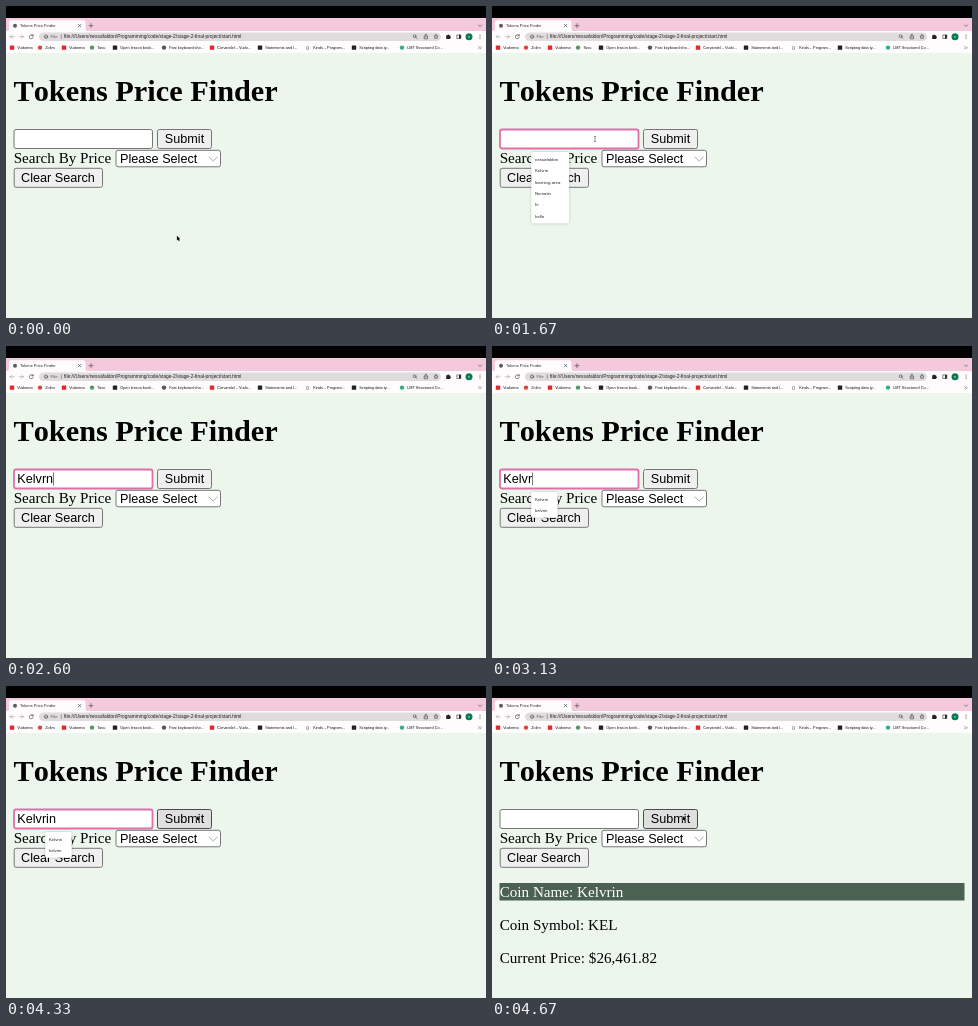
Animation of 480 by 312 pixels, one loop 4.94 s. Source, as an HTML page:

```html
<!DOCTYPE html>
<html lang="en">
<head>
<meta charset="utf-8">
<title>Tokens Price Finder</title>
<style>
  html, body { margin: 0; width: 100%; height: 100%; overflow: hidden; background: #edf6ed; }
  svg { display: block; width: 100vw; height: 100vh; }
  text { font-family: "Liberation Sans", Arial, sans-serif; white-space: pre; }
  .serif { font: 15.15px "Liberation Serif", "Times New Roman", serif; }
  .title { font: bold 30.3px "Liberation Serif", "Times New Roman", serif; font-kerning: none; }
  .ui { font-size: 12.65px; }
  .tiny { font-size: 3.85px; fill: #111; }
  .hint { font-size: 4.3px; fill: #222; }
  .control { fill: #efefef; stroke: #767676; stroke-width: 1; }
  .icon { fill: none; stroke: #55505a; stroke-width: .7; stroke-linecap: round; stroke-linejoin: round; }
  .menu rect { fill: #fff; filter: drop-shadow(0 .5px .8px rgba(0, 0, 0, .25)); }
</style>
</head>
<body>
<svg viewBox="0 0 480 312" preserveAspectRatio="none">
  <rect width="480" height="312" fill="#edf6ed"/>

  <!-- browser chrome -->
  <rect width="480" height="12" fill="#000"/>
  <rect y="12" width="480" height="14" fill="#f4c9dc"/>
  <rect y="25" width="480" height="22" fill="#fefcfd"/>
  <path d="M1 25.2Q3 25 3 23V16.500Q3 14.200 5.500 14.200H77Q79.500 14.200 79.500 16.500V23Q79.500 25 81.500 25.200Z" fill="#fefcfd"/>
  <circle cx="9" cy="19.700" r="2" fill="#5b5b60"/>
  <text x="14" y="21.200" font-size="4.020" fill="#222">Tokens Price Finder</text>
  <path class="icon" d="M72.300 18.300l2.600 2.600m0-2.600l-2.600 2.600M83 19.700h4m-2-2v4M472.500 19l1.500 1.500 1.500-1.500"/>
  <path class="icon" stroke-opacity=".45" d="M8.300 30.700H4.200m1.800-1.800l-1.800 1.800 1.800 1.800M13.200 30.700h4.100m-1.800-1.800l1.800 1.800-1.800 1.800"/>
  <path class="icon" d="M27 29.700a2 2 0 1 0 .2 1.700M27.200 28.400v1.500h-1.500"/>
  <rect x="33" y="26.400" width="402" height="8.600" rx="4.300" fill="#dfdcde"/>
  <g class="icon">
    <circle cx="40" cy="30.700" r="1.700"/>
    <path d="M40 30.600v.9M55.300 28.700v4" stroke-width=".5"/>
    <circle cx="408.600" cy="30.200" r="1.400"/>
    <path d="M409.700 31.300l1.300 1.300M418.800 30h-.6v2.800h3.400V30h-.6M419.900 31.400v-3.200m-1 1l1-1 1 1"/>
    <path d="M430 28.600l.6 1.400 1.500.1-1.100 1 .3 1.500-1.300-.8-1.300.8.3-1.500-1.100-1 1.500-.1z"/>
    <rect x="451.200" y="28.900" width="3.600" height="3.600"/>
    <path d="M472.500 40.500l1.200 1.200-1.200 1.200m1.700-2.400l1.200 1.200-1.200 1.200" stroke-width=".5"/>
  </g>
  <path d="M440.200 29.300h1.200a.8.800 0 0 1 1.600 0h1.200v1.200a.8.800 0 0 1 0 1.600v.9h-4z" fill="#222"/>
  <rect x="453" y="28.900" width="1.800" height="3.600" fill="#222"/>
  <circle cx="463" cy="30.700" r="3.500" fill="#0b7a52"/>
  <text x="463" y="31.900" font-size="3.600" fill="#fff" text-anchor="middle">n</text>
  <g fill="#444"><circle cx="474" cy="29.100" r=".5"/><circle cx="474" cy="30.700" r=".5"/><circle cx="474" cy="32.300" r=".5"/></g>
  <text x="44.500" y="32.200" font-size="4.400" fill="#555">File</text>
  <text x="58" y="32.200" font-size="4.870" fill="#222">file:&#47;&#47;/Users/nessafaldon/Programming/code/stage-2/stage-2-final-project/start.html</text>
  <g id="marks"></g>

  <!-- page -->
  <text class="title" x="7.500" y="95">Tokens Price Finder</text>
  <rect id="field" x="8" y="123.500" width="138.500" height="19" rx="2" fill="#fff"/>
  <text id="typed" class="ui" x="11.300" y="137.200"></text>
  <rect id="caret" y="126.500" width=".7" height="13" fill="#444"/>
  <rect id="submit" class="control" x="151.500" y="123.500" width="54" height="19" rx="2"/>
  <text class="ui" x="158.800" y="137.200">Submit</text>
  <text class="serif" x="7.700" y="157">Search By Price</text>
  <rect class="control" x="110" y="144.300" width="104.500" height="16.500" rx="2" style="fill:#fff"/>
  <text class="ui" x="114" y="157">Please Select</text>
  <path class="icon" d="M203 151l4.200 4 4.200-4" style="stroke:#888"/>
  <rect class="control" x="8.200" y="162.300" width="88.300" height="19" rx="2"/>
  <text class="ui" x="15" y="176.200">Clear Search</text>

  <g id="result">
    <rect x="7.500" y="197" width="465" height="17.500" fill="#4b6152"/>
    <text class="serif" x="7.700" y="211" fill="#fff">Coin Name: Kelvrin</text>
    <text class="serif" x="7.700" y="243.800">Coin Symbol: KEL</text>
    <text class="serif" x="7.700" y="276.500">Current Price: $26,461.82</text>
  </g>

  <g id="history" class="menu"></g>
  <g id="matches" class="menu"></g>

  <g id="pointer">
    <path id="arrow" d="M-1.600-2.600V2l1.100-1 .8 1.800.9-.4-.8-1.700h1.500z" fill="#000" stroke="#fff" stroke-width=".5" paint-order="stroke"/>
    <path id="beam" d="M-1.100-2.700Q0-2.700 0-2Q0-2.700 1.100-2.700M0-2V2M-1.100 2.700Q0 2.700 0 2Q0 2.700 1.100 2.700" fill="none" stroke="#444" stroke-width=".6"/>
  </g>
</svg>

<script>
const LOOP = 4940, TICK = 1000 / 15;
const $ = id => document.getElementById(id);

function add(parent, tag, attrs, text = "") {
  const el = document.createElementNS(parent.namespaceURI, tag);
  for (const key in attrs) el.setAttribute(key, attrs[key]);
  el.textContent = text;
  parent.append(el);
  return el;
}

// Bookmarks: icon centre, colour, round icon, label
const bookmarks = [
  [6, "#e8262a", 0, "Vudorma"], [34, "#d9443a", 1, "Zolim"],
  [58, "#e8262a", 0, "Vudorma"], [86, "#4a9a62", 1, "Tavu"],
  [109, "#222", 0, "Open lesson book..."], [158, "#555", 1, "Fast keyboard sho..."],
  [206, "#e8262a", 0, "Corvandel – Vudo..."], [254, "#222", 0, "Statements and l..."],
  [302, "", 0, "Kinds – Program..."], [348, "#222", 0, "Scripting data ty..."],
  [396, "#2fae8c", 1, "LMT Structured Co..."]
];
for (const [x, fill, round, label] of bookmarks) {
  if (fill) add($("marks"), "rect", { x: x - 2.2, y: 39.4, width: 4.4, height: 4.4, rx: round ? 2.2 : .5, fill });
  else add($("marks"), "text", { x: x - 1.8, y: 43, class: "tiny" }, "{}");
  add($("marks"), "text", { x: x + 5.2, y: 43, class: "tiny" }, label);
}

function fillMenu(menu, width, items) {
  add(menu, "rect", { x: 39.2, y: 146, width, height: items.length * 11.4 + 3, rx: 1.5 });
  items.forEach((item, i) => add(menu, "text", { x: 43, y: 154.7 + i * 11.4, class: "hint" }, item));
}
fillMenu($("history"), 38, ["nessafaldon", "Kelvrin", "learning-area", "Norvatin", "hi", "hello"]);
fillMenu($("matches"), 26.5, ["Kelvrin", "kelvrin"]);

// Start time and field content, with one slip and its correction
const typing = [
  [0, ""], [1730, "K"], [2000, "Ke"], [2070, "Kel"], [2330, "Kelv"], [2400, "Kelvr"],
  [2600, "Kelvrn"], [3070, "Kelvr"], [3270, "Kelvri"], [3400, "Kelvrin"], [4670, ""]
];

const show = (id, on) => $(id).setAttribute("visibility", on ? "visible" : "hidden");
const style = (id, attrs) => { for (const key in attrs) $(id).setAttribute(key, attrs[key]); };
const within = (t, from, to) => t >= from && t < to;
const mix = (a, b, p) => a + (b - a) * p;
const ease = (t, from, to) => {
  const p = Math.min(1, Math.max(0, (t - from) / (to - from)));
  return p * p * (3 - 2 * p);
};

function draw(now) {
  const t = Math.floor((now % LOOP + 4) / TICK) * TICK + 4;

  const text = typing.findLast(([start]) => t >= start)[1];
  $("typed").textContent = text;
  const width = text ? $("typed").getComputedTextLength() : 0;
  style("caret", { x: 11.2 + width });
  show("caret", within(t, 800, 1270) || within(t, 1730, 3930));

  const focused = within(t, 800, 4470);
  style("field", focused ? { stroke: "#dd70a8", "stroke-width": 1.8 }
    : within(t, 670, 800) ? { stroke: "#4c4e55", "stroke-width": 1.1 }
    : { stroke: "#767676", "stroke-width": 1 });

  show("history", within(t, 800, 1730));
  show("matches", within(t, 1730, 2600) || within(t, 3070, 4400));
  show("result", t >= 4670);

  const late = t >= 3800;
  const p = late ? ease(t, 3740, 4270) : ease(t, 0, 330);
  const x = late ? mix(138, 192.5, p) : mix(172.5, 103, p);
  const y = late ? mix(127.6, 132.5, p) : mix(232.5, 133, p);
  const inField = x < 147 && y > 123 && y < 143;
  const visible = !within(t, 1730, 3800);
  $("pointer").setAttribute("transform", `translate(${x} ${y})`);
  show("arrow", visible && !inField);
  show("beam", visible && inField);

  const hover = late && x > 151;
  $("submit").style.fill = hover ? "#dfdfdf" : "";
  $("submit").style.stroke = t >= 4330 ? "#4a4a4a" : "";
}

function frame() {
  draw(performance.now());
  requestAnimationFrame(frame);
}
frame();
</script>
</body>
</html>
```
